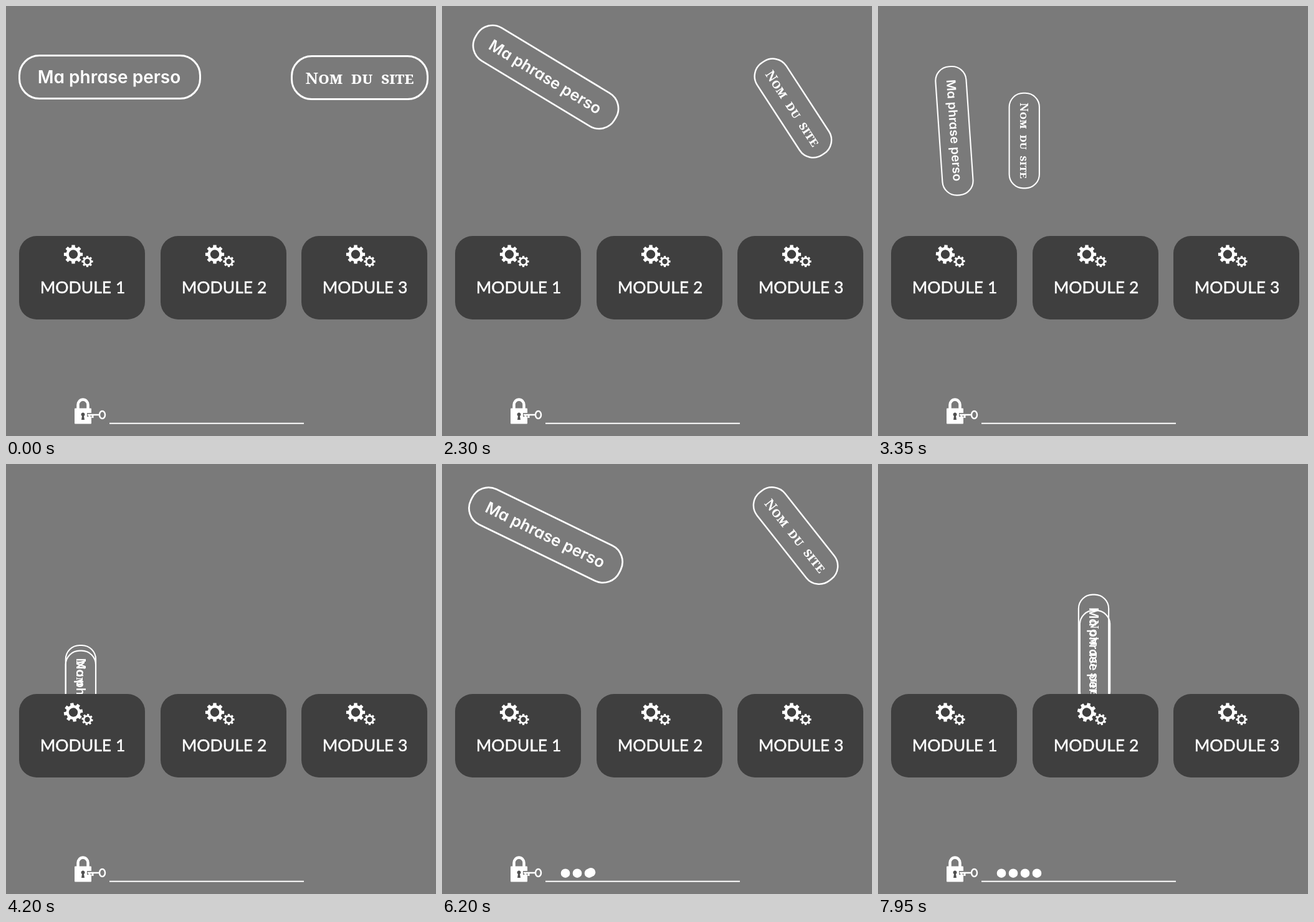
Recreate the animation shown at these times as an HTML page. Size 690 by 690 pixels, loop 8 s.

```html
<!DOCTYPE html>
<html lang="fr">
<head>
<meta charset="utf-8">
<style>
  html, body { margin: 0; width: 100%; height: 100%; overflow: hidden; background: #7a7a7a; }
  svg { display: block; width: 100vw; height: 100vh; }
  text { fill: #fff; text-anchor: middle; }
  .pill rect { fill: none; stroke: #fff; stroke-width: 3; }
  .phrase { font: 600 28px Inter, sans-serif; font-feature-settings: "cv11"; }
  .site { font: small-caps bold 26px "Noto Serif", serif; word-spacing: 7px; }
  .label { font: 26.5px Lato, sans-serif; stroke: #fff; stroke-width: .5; }
</style>
</head>
<body>
<svg viewBox="0 0 690 690">
  <clipPath id="above"><rect width="690" height="440"/></clipPath>
  <g clip-path="url(#above)">
    <g class="pill" id="phrase">
      <rect x="-145" y="-34.5" width="290" height="69" rx="32"/>
      <text class="phrase" x="-1" y="10">Ma phrase perso</text>
    </g>
    <g class="pill" id="site">
      <rect x="-109" y="-34.5" width="218" height="69" rx="32"/>
      <text class="site" y="10">Nom du site</text>
    </g>
  </g>
  <g id="dots" fill="#fff"></g>
  <g id="modules"></g>
  <g id="lock" fill="none" stroke="#fff">
    <path d="M115.500 646v-6a8 8.500 0 0 1 16 0v6" stroke-width="4.500"/>
    <rect x="110" y="645.500" width="27" height="25" rx="1" fill="#fff" stroke="none"/>
    <path d="M121 664l1-6a3 3 0 1 1 3 0l1 6z" fill="#505050" stroke="none"/>
    <path d="M130 656h20" stroke="#7a7a7a" stroke-width="6"/>
    <path d="M131 656h18" stroke-width="2.500"/>
    <path d="M134 656v5M139 656v5" stroke-width="3"/>
    <ellipse cx="154.500" cy="656" rx="4.500" ry="6" stroke-width="2.500"/>
    <path d="M166 669.800h312" stroke-width="2"/>
  </g>
</svg>
<script>
const LOOP = 8000, STEP = 50, CYCLE = 4000, RESET = 4600, TURN = 1720;
const $ = id => document.getElementById(id);
const ramp = (t, from, to) => Math.max(0, Math.min(1, (t - from) / (to - from)));
const mix = (a, b, p) => a + (b - a) * p;
const easeInOut = u => (1 - Math.cos(Math.PI * u)) / 2;

function add(parent, tag, attrs, text = "") {
  const el = document.createElementNS("http://www.w3.org/2000/svg", tag);
  for (const name in attrs) el.setAttribute(name, attrs[name]);
  el.textContent = text;
  return parent.appendChild(el);
}

// Point at p on a Bézier curve, by repeated mixing of its control points
function bezier(points, p) {
  if (points.length === 1) return points[0];
  const mixed = points.slice(1).map((b, i) => b.map((v, axis) => mix(points[i][axis], v, p)));
  return bezier(mixed, p);
}

function gearPath(outer, root, hole) {
  const points = [];
  for (let i = 0; i < 8; i++)
    for (const [r, offset] of [[root, -.25], [outer, -.17], [outer, .17], [root, .25]]) {
      const a = i * Math.PI / 4 + offset;
      points.push((r * Math.cos(a)).toFixed(2) + " " + (r * Math.sin(a)).toFixed(2));
    }
  return `M${points.join("L")}ZM${hole} 0A${hole} ${hole} 0 1 0 ${-hole} 0A${hole} ${hole} 0 1 0 ${hole} 0Z`;
}

// Each pill turns from "spin" on, then flies to module 1 and, a cycle later, to module 2
const pills = [
  { el: $("phrase"), spin: 1705, home: [166.5, 114], flights: [
    { start: 2450, end: 4700, via: [[100, 165], [112, 330], [124, 430]] },
    { start: 2450, end: 4700, via: [[135, 190], [420, 270], [349, 400]] }] },
  { el: $("site"), spin: 1212, home: [567.5, 115], flights: [
    { start: 1700, end: 4700, via: [[618, 330], [-66, 45], [152, 448]] },
    { start: 2450, end: 4700, via: [[630, 190], [245, 270], [349, 400]] }] }
];

const dots = [0, 1, 2, 3].map(() => add($("dots"), "circle", { r: 7.3 }));

const modules = [21, 248, 474].map((x, i) => {
  const g = add($("modules"), "g", { transform: `translate(${x} 369)` });
  add(g, "rect", { width: 202, height: 134, rx: 28, fill: "#3f3f3f" });
  add(g, "text", { class: "label", x: 102, y: 92 }, "MODULE " + (i + 1));
  const gear = (...size) => add(g, "path", { d: gearPath(...size), fill: "#fff", "fill-rule": "evenodd" });
  return { big: gear(15.3, 11.6, 7.2), small: gear(9.2, 6.9, 4.2) };
});

function draw(t) {
  const cycle = t < RESET ? 0 : 1, local = t - cycle * CYCLE;
  const opacity = cycle ? ramp(t, 4950, 5950) : 1 - ramp(t, 4250, 4550);
  for (const { el, spin, home, flights } of pills) {
    const { start, end, via } = flights[cycle];
    const turn = ramp(local, spin, spin + TURN);
    const [x, y] = bezier([home, ...via], easeInOut(ramp(local, start, end)));
    el.setAttribute("transform", `translate(${x} ${y}) rotate(${90 * turn}) scale(${1 - .3 * turn})`);
    el.setAttribute("opacity", opacity);
  }
  dots.forEach((el, i) => {
    const start = 4800 + 165 * i, p = ramp(t, start, start + 1000);
    el.setAttribute("cx", mix(123, 198 + 19 * i, p ** 1.3));
    el.setAttribute("cy", mix(490, 656.7, 1 - (1 - p) ** 2));
  });
  modules.forEach(({ big, small }, i) => {
    const start = 2800 + CYCLE * i, angle = 270 * ramp(t, start, start + 3000);
    big.setAttribute("transform", `translate(87 29.5) rotate(${angle})`);
    small.setAttribute("transform", `translate(109.500 41) rotate(${-angle})`);
  });
}

function tick() {
  draw(Math.floor(performance.now() % LOOP / STEP) * STEP);
  requestAnimationFrame(tick);
}
tick();
</script>
</body>
</html>
```
